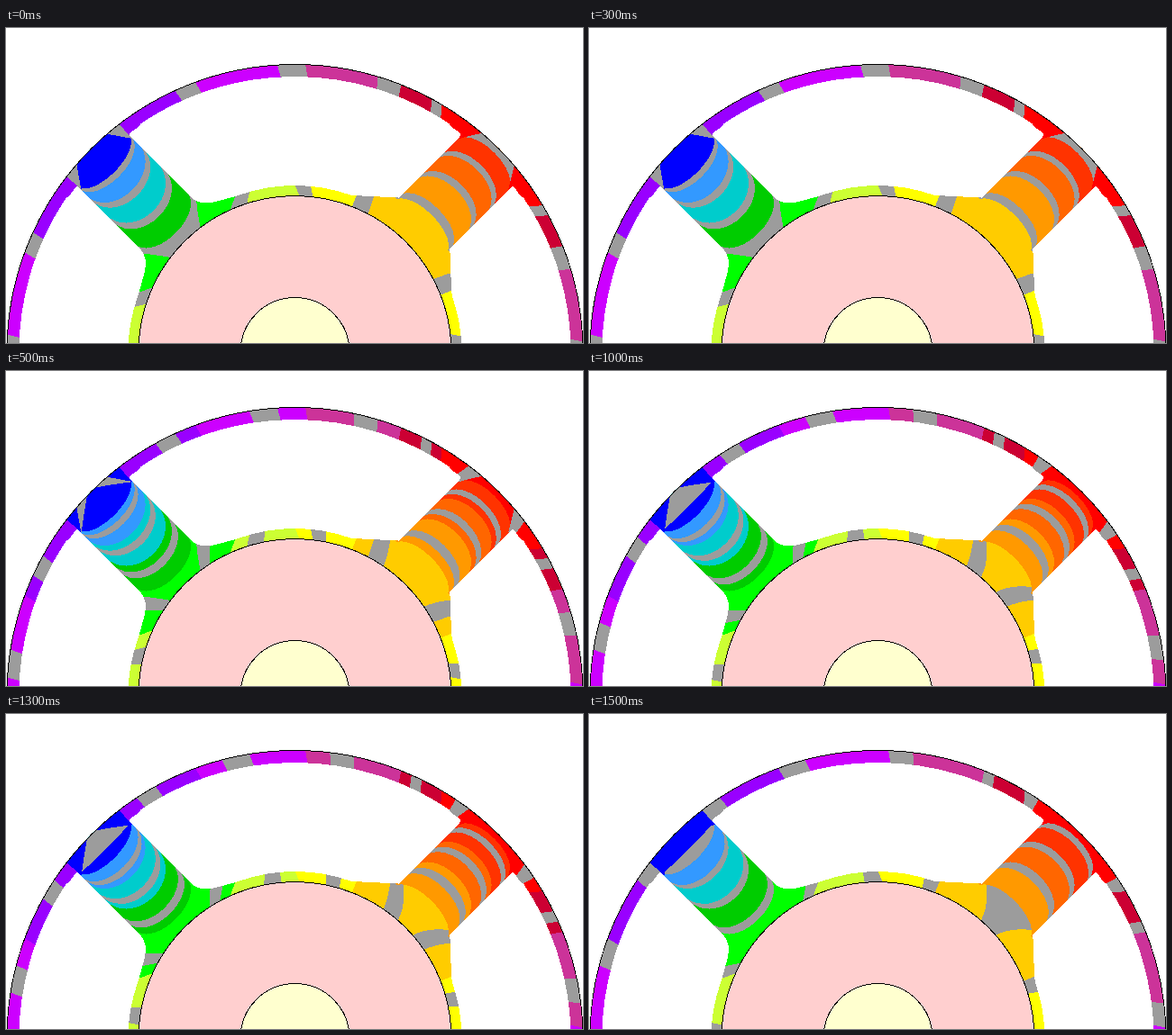
An HTML page for the animation above (2 s loop, 640 by 350 pixels).

```html
<!DOCTYPE html>
<html lang="en">
<head>
<meta charset="utf-8">
<title>Rotating field</title>
<style>
  html, body { margin: 0; width: 100%; height: 100%; overflow: hidden; background: #fff; }
  svg { display: block; width: 640px; height: 350px; shape-rendering: crispEdges; }
</style>
</head>
<body>
<svg id="stage" viewBox="0 0 640 350"></svg>
<script>
const GRAY = '#9c9c9c';
const STEP = 500, PHASES = 4;
const LEFT = 'matrix(0 1 1 0 0 0)', RIGHT = 'matrix(0 -1 -1 0 0 0)';

// Band starts as [colour, outer angle, inner angle], in degrees from the top.
// Every band has four quarters; the gray one advances with the phase.
const ring = [
  ['#f00', 44, 39], ['#c03', 30.5, 32.7], ['#c39', 21.6, 22.4],
  ['#c0f', 2, 3], ['#90f', -20.3, -19.5], ['#00f', -37.7, -37.2],
  ['', -50.7, -37.6]
];
const hub = [
  ['#0f0', -37.7, -41.9], ['#cf3', -15, -25.2], ['#ff0', -2.7, 2],
  ['#fc0', 21.5, 21.4], ['', 39.8, 47.9]
];
// Arc starts across the spokes as [colour, height at the edges, height in the middle].
const coldSpoke = [
  ['#39f', 298, 283], ['#0cc', 280, 255], ['#0c0', 250, 222], ['', 206, 187]
];
const hotSpoke = [
  ['#f90', 200, 215], ['#f60', 233, 254], ['#f30', 265, 286], ['', 296, 313]
];

const mix = (a, b, t) => a + (b - a) * t;
const tone = (color, quarter, phase) => quarter === phase ? GRAY : color;
const path = (d, fill) => `<path d="${d}" fill="${fill}"/>`;
const group = (transform, body) => `<g transform="${transform}">${body}</g>`;
const disc = (r, fill) => `<circle r="${r}" fill="${fill}" stroke="#000"/>`;

function polar(deg, r) {
  const a = deg * Math.PI / 180;
  return `${(r * Math.sin(a)).toFixed(2)} ${(-r * Math.cos(a)).toFixed(2)}`;
}

function sector([o1, i1, b1], [o2, i2, b2], rOut, rIn, fill) {
  const sweep = o2 > o1 ? 1 : 0, mid = (rOut + rIn) / 2;
  const bend = (o, i, b) => polar((o + i) / 2 + b, mid);
  return path(`M${polar(o1, rOut)}A${rOut} ${rOut} 0 0 ${sweep} ${polar(o2, rOut)}` +
    `Q${bend(o2, i2, b2)} ${polar(i2, rIn)}` +
    `A${rIn} ${rIn} 0 0 ${1 - sweep} ${polar(i1, rIn)}Q${bend(o1, i1, b1)} ${polar(o1, rOut)}Z`, fill);
}

// Quarter sectors; skip(band, quarter) leaves out those the spokes paint.
function sectors(bands, rOut, rIn, phase, skip, bulge) {
  let out = '';
  for (let n = 0; n < bands.length - 1; n++) {
    const [color, o1, i1] = bands[n], [, o2, i2] = bands[n + 1];
    const edge = t => [mix(o1, o2, t), mix(i1, i2, t), bulge(n, t)];
    for (let q = 0; q < 4; q++) {
      if (skip(n, q)) continue;
      out += sector(edge(q / 4), edge((q + 1) / 4), rOut, rIn, tone(color, q, phase));
    }
  }
  return out;
}

const spokeBase = fill => path('M-45-150H45V-335H-45Z', fill);

// Everything on the rim side of a curved line across the spoke.
function beyond(edge, middle, fill) {
  const c = -(edge + (middle - edge) * 4 / 3);
  return path(`M-45 ${-edge}H-40C-31 ${c} 31 ${c} 40 ${-edge}H45V-335H-45Z`, fill);
}

function hotArcs(phase) {
  let out = '';
  for (let n = 0; n < 3; n++) {
    const [color, e1, m1] = hotSpoke[n], [, e2, m2] = hotSpoke[n + 1];
    for (let q = 0; q < 4; q++)
      out += beyond(mix(e1, e2, q / 4), mix(m1, m2, q / 4), tone(color, q, phase));
  }
  return out + beyond(296, 313, tone('#f00', 0, phase));
}

function coldArcs(phase) {
  let out = '';
  for (let n = 2; n >= 0; n--) {
    const [color, e1, m1] = coldSpoke[n], [, e2, m2] = coldSpoke[n + 1];
    for (let q = 3; q >= 0; q--)
      out += beyond(mix(e1, e2, (q + 1) / 4), mix(m1, m2, (q + 1) / 4), tone(color, q, phase));
  }
  return out + beyond(298, 283, tone('#00f', 3, phase)) + beyond(298, 297, tone('#00f', 2, phase));
}

const around = body => group(LEFT, body) + group(RIGHT, body) + group('', body);

function field(phase) {
  const hubPart = sectors(hub, 208, 171, phase,
    (n, q) => n === 0 && q === 0 || n === 3 && q === 3,
    (n, t) => n === 3 ? 4 * t * t : 0);
  const ringPart = sectors(ring, 321, 298, phase,
    (n, q) => n === 0 && q === 0 || n === 5 && q > 1,
    () => 0);
  return group('rotate(-45)', spokeBase(tone('#0f0', 0, phase))) +
    group('rotate(45)', spokeBase(tone('#fc0', 3, phase))) +
    around(hubPart) +
    group('rotate(-45)', coldArcs(phase)) +
    group('rotate(45)', hotArcs(phase)) +
    around(ringPart);
}

const gap = path('M-182.5-239C-188-245-174-246-171-253.8A306 306 0 0 1 171-253.8' +
  'C174-246 188-245 182.5-239L115-171.5C106-173 92-172 83-173S70-173 62-174.3' +
  'A185 185 0 0 0-60-175C-68-172-74-171-84-168S-106-163-116-172.6Z', '#fff');

let fields = '';
for (let p = 0; p < PHASES; p++)
  fields += `<g class="field" visibility="${p ? 'hidden' : 'visible'}">${field(p)}</g>`;

const stage = document.getElementById('stage');
stage.innerHTML = '<clipPath id="rim"><circle r="319.5"/></clipPath>' +
  group('translate(320.5 360)',
    `<g clip-path="url(#rim)">${fields}${around(gap)}</g>` +
    disc(319.5, 'none') + disc(173.5, '#ffcfcf') + disc(60.5, '#ffffcf'));

const layers = [...stage.querySelectorAll('.field')];
const start = performance.now();
let shown = 0;

function tick() {
  const phase = Math.floor((performance.now() - start) / STEP) % PHASES;
  if (phase !== shown) {
    layers[shown].setAttribute('visibility', 'hidden');
    layers[phase].setAttribute('visibility', 'visible');
    shown = phase;
  }
  requestAnimationFrame(tick);
}
requestAnimationFrame(tick);
</script>
</body>
</html>
```
